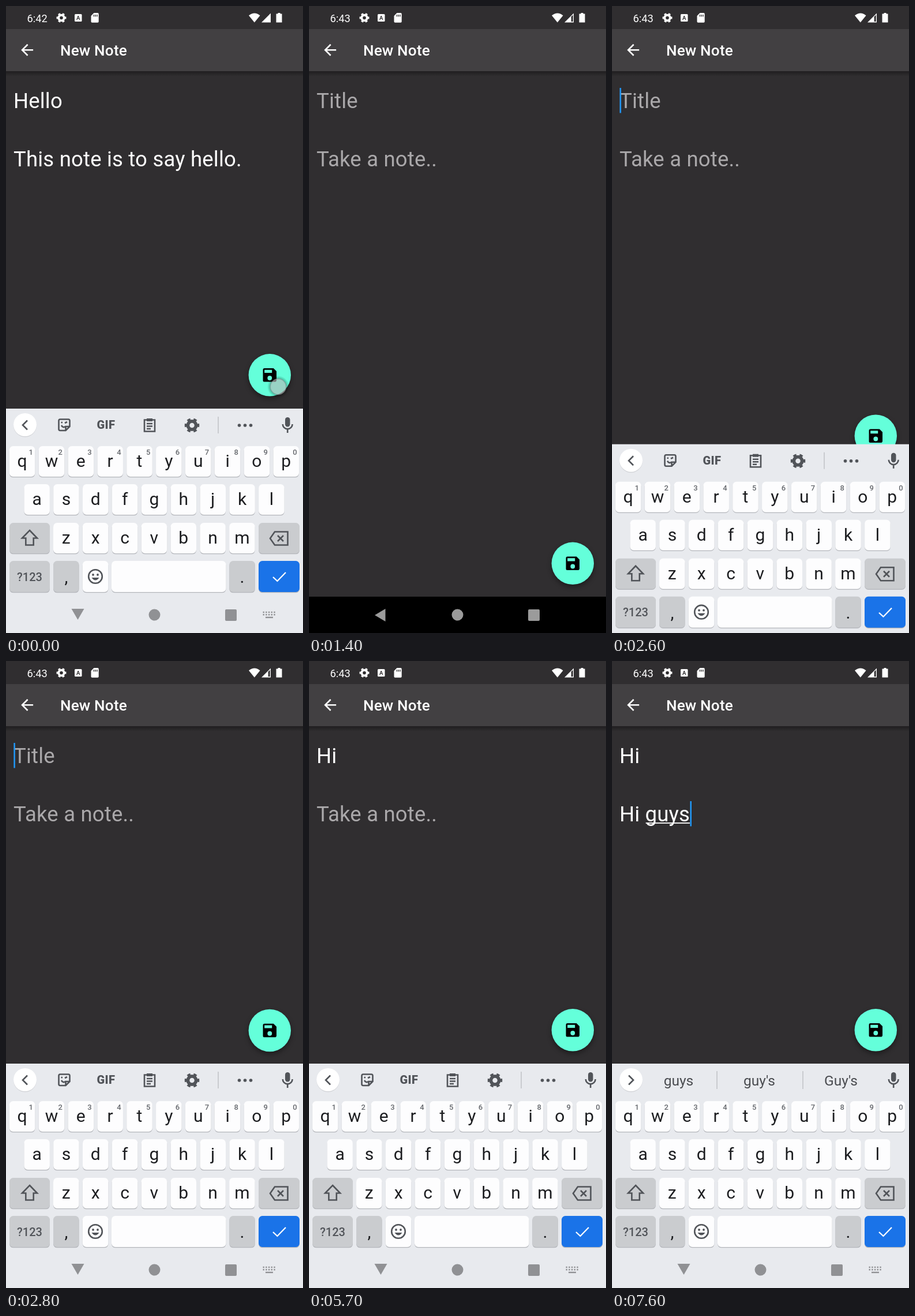
Animation, 515 px wide and 1087 px high, one loop 8 s. Source, as an HTML page:

```html
<!DOCTYPE html>
<html lang="en">
<head>
<meta charset="utf-8">
<title>Notes app</title>
<style>
  html, body { margin: 0; width: 100%; height: 100%; overflow: hidden; background: #302e30; }
  svg { display: block; position: absolute; left: 0; top: 0; }
  text { font-family: Roboto, sans-serif; white-space: pre; }
  .mid { text-anchor: middle; }
  .head { font-size: 26.1px; font-weight: 500; letter-spacing: .2px; fill: #fff; }
  .field { font-size: 36.5px; letter-spacing: .2px; fill: #fff; }
  .hint { fill: #aaa8aa; }
  .letter { font-size: 30px; fill: #1c1d20; }
  .digit { font-size: 13px; font-weight: 500; fill: #65686d; }
  .word { font-size: 24.5px; fill: #4a4c50; }
  .line { fill: none; stroke: #515459; stroke-width: 2.6; }
  .solid { fill: #515459; }
  #fab { filter: drop-shadow(0 4px 4px rgba(0, 0, 0, .4)); }
</style>
</head>
<body>
<svg width="515" height="1087" viewBox="0 0 515 1087">
  <defs>
    <linearGradient id="shade" x2="0" y2="1">
      <stop offset="0" stop-color="#000" stop-opacity=".36"/>
      <stop offset="1" stop-color="#000" stop-opacity="0"/>
    </linearGradient>
    <radialGradient id="halo">
      <stop offset=".68" stop-color="#000" stop-opacity=".32"/>
      <stop offset="1" stop-color="#000" stop-opacity="0"/>
    </radialGradient>
    <g id="page">
      <rect width="515" height="1087" fill="#302e30"/>
      <rect y="40" width="515" height="73" fill="#424042"/>
      <rect y="113" width="515" height="9" fill="url(#shade)"/>
    </g>
  </defs>

  <use href="#page"/>
  <text class="head" x="20.9" y="86">Flutter Notes</text>

  <g id="note">
    <use href="#page"/>
    <path transform="translate(21 60.6) scale(1.304)" fill="#fff" d="M20 11H7.83l5.59-5.59L12 4l-8 8 8 8 1.41-1.41L7.83 13H20z"/>
    <text class="head" x="93.9" y="86">New Note</text>
    <g id="title"></g>
    <g id="body"></g>
  </g>

  <g id="nav">
    <rect y="1024" width="515" height="63"/>
    <g fill="#9b9b9b">
      <path d="M114 1056L132.500 1045V1067Z"/>
      <circle cx="257.500" cy="1055.500" r="10"/>
      <rect x="380" y="1046" width="20" height="20" rx="2"/>
    </g>
  </g>

  <g id="fab">
    <circle r="36.700" fill="#64ffda"/>
    <path id="save" transform="scale(1.304) translate(-12 -12)" d="M17 3H5a2 2 0 0 0-2 2v14a2 2 0 0 0 2 2h14c1.100 0 2-.9 2-2V7zM12 19a3 3 0 1 1 0-6 3 3 0 0 1 0 6zM15 9H5V5h10z"/>
    <path id="plus" d="M-9.200 0H9.200M0-9.200V9.200" stroke="#111" stroke-width="2.600"/>
  </g>

  <g id="keyboard"></g>

  <g id="status" fill="#fff">
    <text id="clock" x="36.500" y="27.500" font-size="18.300"></text>
    <rect x="119" y="14" width="12.500" height="13" rx="1.500"/>
    <text class="mid" x="125.200" y="24" font-size="9.500" font-weight="700" style="fill:#302e30">A</text>
    <path d="M152.500 12H159a1.700 1.700 0 0 1 1.700 1.700V27a1.700 1.700 0 0 1-1.700 1.700H149.200a1.700 1.700 0 0 1-1.700-1.700V17Z"/>
    <path d="M152.500 15V18.500M155.300 15V18.500M158 15V18.500" stroke="#302e30" stroke-width="1.300"/>
    <path d="M421 16.500Q431 8.500 440.500 16.500L430.800 28.500Z"/>
    <path d="M443 28.500L459 12.500V28.500Z"/>
    <path id="gap" d="M454.700 18.600L457.700 15.600V27H454.700Z" fill="#302e30"/>
    <path d="M471.500 12H475.500V13.500H478.500V28.500H468.500V13.500H471.500Z"/>
  </g>

  <g id="touch">
    <circle r="19" fill="url(#halo)"/>
    <circle r="13.500" fill="#fff" fill-opacity=".46" stroke="#8f9799" stroke-opacity=".55" stroke-width="1.500"/>
  </g>
</svg>
<script>
const LOOP = 8000;
const $ = id => document.getElementById(id);

// Drawing helpers that return markup
const path = (d, cls = 'line', more = '') => `<path class="${cls}" d="${d}" ${more}/>`;
const label = (s, x, y, cls, more = '') => `<text class="mid ${cls}" x="${x}" y="${y}" ${more}>${s}</text>`;
const gear = (x, y, r, color) => `<g fill="none" stroke="${color}" transform="translate(${x} ${y})">
  <circle r="${r * .57}" stroke-width="${r * .46}"/>
  <circle r="${r * .86}" stroke-width="${r * .32}" pathLength="12" stroke-dasharray="1 1" stroke-dashoffset=".5"/></g>`;
const key = (x, y, w, fill = '#fdfdfe', h = 53) =>
  `<rect x="${x}" y="${y + 1.3}" width="${w}" height="${h}" rx="6.5" fill="#b4b6bb"/>
   <rect x="${x}" y="${y}" width="${w}" height="${h}" rx="6.5" fill="${fill}"/>`;

function keyRow(letters, x, y, digits) {
  return [...letters].map((c, i) => {
    const left = x + i * 50.85;
    return key(left, y, 44.6) + label(c, left + 22.3, y + 36, 'letter') +
      (digits ? label((i + 1) % 10, left + 37.5, y + 15, 'digit') : '');
  }).join('');
}

function buildKeyboard() {
  const gray = '#cacccf';
  const tools =
    path('M37 718.5L29 726.5L37 734.5') +
    path('M94 716.500H108Q110.500 716.500 110.500 719V729L103.500 736H94Q91.500 736 91.500 733.500V719Q91.500 716.500 94 716.500ZM103.500 736V729H110.500M96 727Q99 732 103 729M95.500 722H98M102 723L106 721') +
    label('GIF', 173.5, 733, 'solid', 'font-size="20" font-weight="800" letter-spacing=".4"') +
    path('M240 717.500H258V737.500H240ZM244 724H254M244 728.500H254M244 733H251') +
    path('M244 715H254V720H244Z', 'solid') +
    gear(322.5, 727, 12.5, '#515459') +
    path('M368 712V741', 'line', 'style="stroke:#bfc1c5;stroke-width:1.5"') +
    [404.5, 414.5, 424.5].map(x => `<circle class="solid" cx="${x}" cy="727" r="2.8"/>`).join('');
  const words = path('M29 718.5L37 726.5L29 734.5') +
    path('M182 711V742M331 711V742', 'line', 'style="stroke:#bfc1c5;stroke-width:1.5"') +
    [115.5, 255.5, 397].map(x => label('', x, 736, 'word')).join('');

  $('keyboard').innerHTML = `
    <rect y="698" width="515" height="389" fill="#e8eaee"/>
    <circle cx="33" cy="727.2" r="20" fill="#cfd1d5"/><circle cx="33" cy="726" r="20" fill="#fff"/>
    <g id="tools">${tools}</g><g id="words">${words}</g>
    <rect class="solid" x="484" y="713" width="8.500" height="16.500" rx="4.200"/>
    ${path('M479.800 725A8.400 8.400 0 0 0 496.600 725M488.200 733.500V740')}` +
    keyRow('qwertyuiop', 5.8, 763, true) + keyRow('asdfghjkl', 31.3, 829) +
    key(6, 896, 70, gray) + path('M41 909L54 922.500H47.700V934.500H34.300V922.500H28Z') +
    keyRow('zxcvbnm', 82, 896) +
    key(438, 896, 71, gray) + path('M466 911.500H488.500V934.500H466L458 923ZM471 918L481 928M481 918L471 928') +
    key(6, 962, 70, gray, 54) + label('?123', 41, 996.5, 'solid', 'font-size="20" font-weight="500"') +
    key(82, 962, 44.6, gray, 54) + label(',', 104.5, 1000, 'letter') +
    key(132.8, 962, 44.6, undefined, 54) +
    '<circle class="line" cx="155" cy="989" r="11.800"/><circle class="solid" cx="151" cy="986" r="1.900"/><circle class="solid" cx="159" cy="986" r="1.900"/>' +
    path('M148.500 991H161.500Q155 1000 148.500 991Z', 'solid') +
    key(183, 962, 198.5, undefined, 54) +
    key(387.3, 962, 44.6, gray, 54) + label('.', 409.5, 1000, 'letter') +
    key(438, 962, 71, '#1a73e8', 54) +
    path('M463 990L470.500 997L485 982', 'line', 'style="stroke:#fff;stroke-width:2.3"') +
    `<g fill="#909194">
      <path d="M113.500 1045H135.500L124.500 1064Z"/><circle cx="257.500" cy="1055.500" r="10"/>
      <rect x="380" y="1046" width="20" height="20" rx="2"/></g>
    <path d="M445.500 1051H467M445.500 1055.300H467" stroke="#909194" stroke-width="2.400" stroke-dasharray="2.400 2.300"/>
    <path d="M450 1060H463" stroke="#909194" stroke-width="2.400"/>`;
}

function buildField(id, y) {
  $(id).innerHTML = `<text class="field" x="13" y="${y}"></text>
    <rect y="${y + 2}" height="1.800" fill="#fff"/>
    <rect y="${y - 35}" width="2.600" height="43.500" fill="#2196f3"/>`;
}

buildKeyboard();
buildField('title', 177);
buildField('body', 278);
$('status').insertAdjacentHTML('afterbegin', gear(96, 20.5, 8.3, '#fff'));

// Timelines: [start, value]
const titleText = [[0, 'Hello'], [700, ''], [3300, 'H'], [3700, 'Hi']];
const bodyText = [[0, 'This note is to say hello.'], [700, ''], [6000, 'H'], [6300, 'Hi'], [6700, 'Hi '],
  [6900, 'Hi g'], [7100, 'Hi gu'], [7300, 'Hi guy'], [7500, 'Hi guys']];
const suggestions = [[0, ''], [3400, 'H He Hi'], [3800, 'Hi His Him'], [5100, ''], [6100, 'H He Hi'],
  [6400, 'Hi His Him'], [7000, 'g get go'], [7200, 'gu guy guys'], [7400, "guy guys guy's"], [7600, "guys guy's Guy's"]];
const touches = [[0, 100, 472, 660], [760, 1000, 457, 949], [2280, 2480, 107.5, 180]];

const entry = (list, t) => list.filter(e => e[0] <= t).pop();
const ramp = (t, a, b) => Math.min(1, Math.max(0, (t - a) / (b - a)));
const easeOut = p => 1 - (1 - p) ** 3;
const show = (el, on) => el.setAttribute('visibility', on ? 'visible' : 'hidden');

function drawField(id, text, hint, from, focused, since, t) {
  const [words, line, cursor] = $(id).children;
  words.textContent = text || hint;
  words.setAttribute('class', text ? 'field' : 'field hint');
  const width = s => {
    if (!s) return 0;
    words.textContent = s;
    const w = words.getComputedTextLength();
    words.textContent = text || hint;
    return w;
  };
  const end = 13 + width(text);
  const start = 13 + width(text.slice(0, from));
  line.setAttribute('x', start + 1);
  line.setAttribute('width', Math.max(0, end - start - 1));
  show(line, focused && text && !text.endsWith(' '));
  cursor.setAttribute('x', end + .3);
  show(cursor, focused && Math.floor((t - since) / 500) % 2 === 0);
}

function draw(t) {
  // Note page slides down and fades on close, up on open
  const page = t < 800 ? 1 - ramp(t, 280, 580) : ramp(t, 1060, 1360);
  const note = $('note');
  note.setAttribute('transform', `translate(0 ${256 * (1 - easeOut(page))})`);
  note.setAttribute('opacity', page * page);
  show(note, page > 0);

  const slide = (a, b, c, d) => t < 1500 ? 1 - ramp(t, a, b) ** 2 : easeOut(ramp(t, c, d));
  const up = slide(180, 430, 2480, 2770);
  $('keyboard').setAttribute('transform', `translate(0 ${389 * (1 - up)})`);
  show($('keyboard'), up > 0);
  $('fab').setAttribute('transform', `translate(457.3 ${966.3 - 326.5 * slide(200, 450, 2500, 2860)})`);
  const home = t >= 300 && t < 1080;
  show($('save'), !home);
  show($('plus'), home);

  $('clock').textContent = t < 400 ? '6:42' : '6:43';
  show($('gap'), t >= 400);

  const [t1, title] = entry(titleText, t);
  drawField('title', title, 'Title', 0, t >= 2400 && t < 5000, Math.max(t1, 2400), t);
  const [t2, body] = entry(bodyText, t);
  drawField('body', body, 'Take a note..', body.indexOf(' ') + 1, t >= 5200, Math.max(t2, 5200), t);

  const words = entry(suggestions, t)[1];
  show($('tools'), !words);
  show($('words'), words);
  const parts = words.split(' ');
  $('words').querySelectorAll('text').forEach((el, i) => el.textContent = parts[i] || '');

  const tap = touches.find(([a, b]) => t >= a && t < b);
  show($('touch'), tap);
  if (tap) $('touch').setAttribute('transform', `translate(${tap[2]} ${tap[3]})`);
}

const begin = performance.now();
function tick() {
  // A small lead keeps hard changes on their side of each step
  draw((performance.now() - begin + 12) % LOOP);
  requestAnimationFrame(tick);
}
tick();
</script>
</body>
</html>
```
